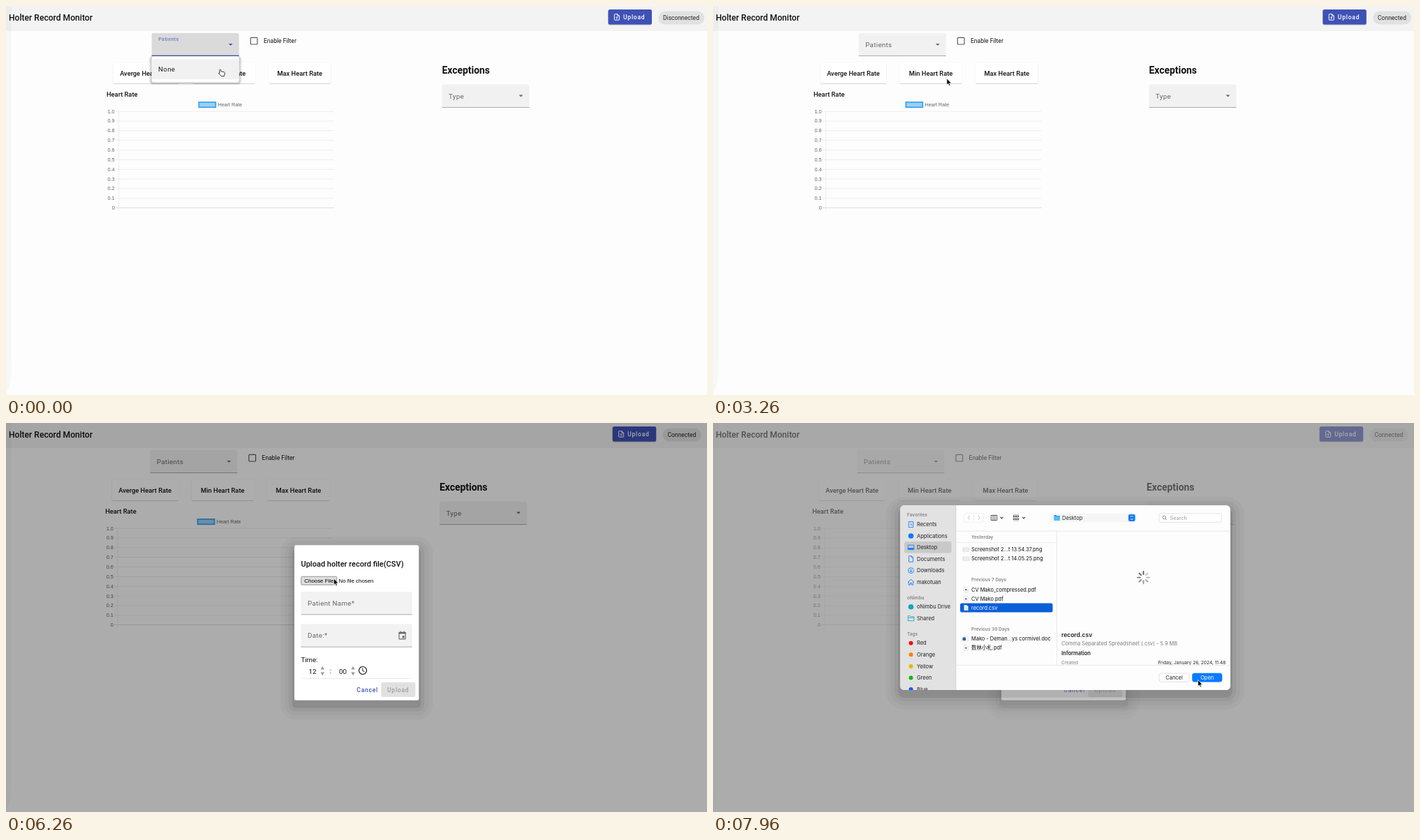
An HTML page that plays this animation: 1004x558 px, repeating every 8 s.

```html
<!DOCTYPE html>
<html lang="en">
<head>
<meta charset="utf-8">
<title>Holter Record Monitor</title>
<style>
html, body { margin: 0; width: 100%; height: 100%; overflow: hidden; background: #fdfdfd; }
svg { display: block; font-family: Roboto, sans-serif; }
.ui { font-family: Inter, sans-serif; }
.chart { font-family: "Liberation Sans", Arial, sans-serif; }
</style>
</head>
<body>
<svg id="stage" width="1004" height="558" viewBox="0 0 1004 558"></svg>
<script>
const LOOP = 8000, BLUE = '#3f51b5', MAC = '#0a7aff';
const MED = 'font-weight="500"', SEMI = 'font-weight="600"', END = 'text-anchor="end"';
const SPACED = 'letter-spacing=".3"', BUTTON = 'font-weight="500" letter-spacing=".76"';

// Cursor moves: first step, last step, number of steps, end point
const moves = [
  [150, 300, 2, 641, 69], [590, 1190, 5, 975, 7], [1490, 1780, 3, 964, 14],
  [2080, 2230, 2, 964, 14], [2820, 2970, 2, 310, 108], [3260, 4300, 8, 889, 15],
  [4440, 4740, 3, 889, 15], [4890, 5360, 4, 539, 217], [5510, 5810, 3, 469.5, 223],
  [6110, 6260, 2, 469.5, 223], [6410, 6560, 2, 473, 223.5], [6770, 7070, 3, 430, 262],
  [7220, 7370, 2, 430, 262], [7520, 7960, 4, 694.5, 368.5]
];
const steps = [{ at: 0, x: 309, y: 95 }];
for (const [from, to, n, x, y] of moves) {
  const start = steps[steps.length - 1];
  for (let i = 0; i < n; i++) {
    const k = (i + 1) / n, e = k * k * (3 - 2 * k);
    steps.push({
      at: Math.round(from + (to - from) * i / (n - 1)),
      x: start.x + (x - start.x) * e,
      y: start.y + (y - start.y) * e
    });
  }
}

// y is the middle of the capitals
const text = (x, y, s, size, fill = '#111', more = '') =>
  `<text x="${x}" y="${y + size * .36}" font-size="${size}" fill="${fill}" ${more}>${s}</text>`;
const rect = (x, y, w, h, fill, r = 0, more = '') =>
  `<rect x="${x}" y="${y}" width="${w}" height="${h}" rx="${r}" fill="${fill}" ${more}/>`;
const path = (d, fill, more = '') => `<path d="${d}" fill="${fill}" ${more}/>`;
const line = (d, color, w = .7, more = '') => path(d, 'none', `stroke="${color}" stroke-width="${w}" ${more}`);
const circle = (x, y, r, fill, more = '') => `<circle cx="${x}" cy="${y}" r="${r}" fill="${fill}" ${more}/>`;
const shift = (dx, dy, s) => `<g transform="translate(${dx} ${dy})">${s}</g>`;
const fade = (o, s) => `<g opacity="${o}">${s}</g>`;
const shadow = (x, y, w, h, r) => [20, 14, 8, 3].map((e, i) =>
  rect(x - e, y - e + 8, w + 2 * e, h + 2 * e, '#000', r + e, `opacity="${[.03, .03, .05, .09][i]}"`)).join('');
const caret = (x, y, fill) => path(`M${x - 2.9} ${y - 1.4}h5.8l-2.9 2.9z`, fill);

function field(x, y, label, open = 0) {
  const color = open ? BLUE : '#666';
  return path(`M${x} ${y + 33}v-30.5q0-2.5 2.5-2.5h120q2.5 0 2.5 2.5v30.5z`, open ? '#dadada' : '#f1f1f1') +
    text(x + 9.5, y + 16.5 - 7.5 * open, label, 9.78 - 2.4 * open, open ? '#5a68bd' : '#666', SPACED) +
    caret(x + 113, y + 16.5, color) +
    rect(x, y + 32.5 - .6 * open, 125, .7 + .6 * open, open ? BLUE : '#8c8c8c');
}

const card = (x, w, label) =>
  rect(x, 82, w, 29.8, '#bdbdbd', 2.5) + rect(x - .3, 81, w + .6, 30.2, '#fff', 2.5, 'stroke="#000" stroke-opacity=".05" stroke-width=".6"') +
  text(x + w / 2, 96.5, label, 9.3, '#111', MED + ' text-anchor="middle"');

function chart() {
  let s = text(144, 126.5, 'Heart Rate', 9.3, '#111', MED);
  let c = rect(276.3, 138, 24, 7.3, '#9bd0f5', 0, 'stroke="#36a2eb" stroke-width="1.7"') +
    text(303.5, 141.5, 'Heart Rate', 7.2, '#666');
  for (let i = 0; i <= 10; i++) {
    const y = 150.8 + i * 13.85;
    const label = i === 10 ? '0' : (1 - i / 10).toFixed(1);
    c += text(155.7, y + .2, label, 7.3, '#666', END) + rect(157, y, 313, .7, i === 10 ? '#cfcfcf' : '#e7e7e7');
  }
  return s + `<g class="chart">${c}</g>` + rect(161.3, 151, .7, 143, '#e9e9e9');
}

function toolbar(t, modal) {
  const online = t >= 2080, dx = online ? 10.8 : 0;
  let button = rect(862.5, 5.8, 62.5, 21.6, '#000', 2.5, 'opacity=".22"') + rect(862.5, 5, 62.5, 21.6, BLUE, 2.5);
  if (t >= 4440 && t < 4740) {
    button += rect(862.5, 5, 62.5, 21.6, '#fff', 2.5, 'opacity=".08"') +
      `<clipPath id="btn">${rect(862.5, 5, 62.5, 21.6, '#fff', 2.5)}</clipPath>` +
      circle(878, 15, t < 4590 ? 22 : 44, '#fff', 'opacity=".1" clip-path="url(#btn)"');
  }
  button += line('M875.8 11.6h-3.6q-.8 0-.8.8v7q0 .8.8.8h5.4q.8 0 .8-.8v-5.2zv2.6h2.6', '#fff', 1) +
    line('M874.9 19v-3.5m-1.5 1.5l1.5-1.5 1.5 1.5', '#fff', .9) +
    text(884, 16, 'Upload', 8.54, '#fff', BUTTON);
  const x = online ? 945.3 : 934.3;
  const chip = rect(x, 7.5, 1000.3 - x, 19, t >= 1190 && !online ? '#cecece' : '#e1e1e1', 9.5) +
    text(x + 6.7, 17, online ? 'Connected' : 'Disconnected', 8.54, '#222');
  return rect(0, 0, 1004, 36, '#f3f3f3') + text(4, 17, 'Holter Record Monitor', 12.1, '#111', MED) +
    shift(dx - 4.6 * modal, 0, button) + shift(-4.6 * modal, 0, chip);
}

function page(t) {
  const modal = t >= 4740 ? 1 : 0, menu = t < 590 ? 1 : t < 740 ? .4 : 0;
  let s = rect(0, 0, 1004, 558, '#fdfdfd') + toolbar(t, modal) +
    path('M0 0H8V515Q8 545 0 555Z', '#000', 'opacity=".025"');
  s += shift(-1.8 * modal, 0,
    card(153.5, 95, 'Averge Heart Rate') + card(267.3, 89.5, 'Min Heart Rate') +
    card(376, 89.5, 'Max Heart Rate') + chart());
  s += shift(-2.4 * modal, 0, field(208.7, 38.8, 'Patients', menu) +
    rect(350.3, 45.3, 9.7, 9.7, 'none', 1, 'stroke="#595959" stroke-width="1.2"') +
    text(369, 50.3, 'Enable Filter', 8.54));
  s += shift(-3.5 * modal, 0, text(624.5, 92, 'Exceptions', 13.9, '#111', 'font-weight="700"') + field(624.5, 112.5, 'Type'));
  if (menu) {
    let drop = '';
    for (let e = 4; e > 0; e--) drop += rect(208.7 - e, 73 - e / 2, 125 + 2 * e, 37.5 + e * 1.2, '#000', 2 + e, 'opacity=".06"');
    s += fade(menu, drop + rect(208.7, 72, 125, 37.5, '#fff', 2.5) + rect(208.7, 76.3, 125, 28.5, '#f1f1f1') +
      text(218, 90.7, 'None', 9.78, '#222', SPACED));
  }
  return s;
}

function dialog(t) {
  const box = (y, label) =>
    path(`M422.5 ${y + 33}v-30.5q0-2.5 2.5-2.5h154q2.5 0 2.5 2.5v30.5z`, '#f2f2f2') +
    rect(422.5, y + 32.5, 159, .7, '#8c8c8c') + text(432, y + 16.5, label, 9.78, '#666', SPACED);
  const spin = x => path(`M${x - 2.7} 353.6h5.4l-2.7-4.6zm0 4h5.4l-2.7 4.6z`, '#999');
  const over = t >= 5810;
  return shadow(413, 175.3, 178.3, 222.5, 2.5) + rect(413, 175.3, 178.3, 222.5, '#fff', 2.5) +
    text(422.5, 202.5, 'Upload holter record file(CSV)', 11, '#111', MED) +
    `<g class="chart">` +
    rect(422.8, 220.2, 51, 12, over ? '#dedede' : '#efefef', 1.5, 'stroke="#6f6f6f" stroke-width=".7"') +
    text(427.3, 226.2, 'Choose File', 7.9, '#000') + text(476.5, 226.2, 'No file chosen', 7.9, '#000') + '</g>' +
    box(242, 'Patient Name*') + box(288.3, 'Date:*') +
    rect(563, 300.3, 9.2, 9.6, 'none', 1, 'stroke="#666" stroke-width="1.1"') +
    rect(562.6, 300, 10, 2.4, '#666') + line('M565 300v-1.6m5.2 1.6v-1.6', '#666', 1.2) +
    rect(567.6, 305.3, 3, 3, '#666') +
    text(422.5, 340, 'Time:', 9.6) + text(433.5, 356, '12', 9.78) + text(463.7, 355.7, ':', 9.78) + text(477, 356, '00', 9.78) +
    spin(453.3) + spin(497) +
    circle(511, 355, 5.5, 'none', 'stroke="#111" stroke-width="1.2"') + line('M510.8 351.6v3.7l2.7 1.6', '#111', 1) +
    rect(422.5, 366.2, 159, .6, '#dcdcdc') +
    text(502.3, 382.5, 'Cancel', 8.54, BLUE, BUTTON) +
    rect(537.3, 372, 49, 21, '#e0e0e0', 2.5) + text(546, 382.5, 'Upload', 8.54, '#9e9e9e', BUTTON);
}

function sidebar() {
  const label = (y, s) => text(278, y, s, 6.5, '#858585', SEMI);
  const ink = (d, color = MAC) => line(d, color, .85);
  let s = rect(268, 115.5, 80, 265, '#e2e2e2') + rect(274, 167.7, 67.5, 16.4, '#c9c9c9', 3) +
    label(129.7, 'Favorites') + label(248, 'oNimbu') + label(300, 'Tags');
  ['Recents', 'Applications', 'Desktop', 'Documents', 'Downloads', 'makotuan'].forEach((name, i) =>
    s += text(292, 143 + i * 16.55, name, 7.5, '#222'));
  s += text(292, 261.3, 'oNimbu Drive', 7.5, '#222') + text(292, 278, 'Shared', 7.5, '#222');
  s += ink('M280.3 139.2h6.4v8h-6.4zM283.5 141.5v2.3h1.6') + circle(283.5, 159.6, 3.8, MAC) +
    ink('M279.3 172.8h8.4v6.4h-8.4zm0 4.7h8.4') + rect(279.3, 177, 8.4, 2.2, MAC) +
    ink('M280.5 188.3h3.8l2.2 2.2v6.3h-6zm3.8 0v2.2h2.2') +
    circle(283.5, 209.2, 4, 'none', `stroke="${MAC}" stroke-width=".85"`) + ink('M283.5 206.8v4.6m-1.9-1.8l1.9 1.9 1.9-1.9') +
    ink('M279 226l4.5-4 4.5 4m-7.7-1v4.8h2.2v-2.8h2v2.8h2.2v-4.8') +
    circle(283.5, 261.3, 3.8, '#16a6b6') +
    ink('M279.3 281.3v-7h3l1 1.1h4.6v5.9zm0-4.4h8.6', '#16a6b6');
  [['Red', '#ff0a0a'], ['Orange', '#ff7f0a'], ['Yellow', '#f0b400'], ['Green', '#0fb80f'], ['Blue', '#0a5cff']].forEach(([name, color], i) => {
    const y = 313.4 + i * 16.55;
    s += circle(283.5, y, 3, color) + text(292, y, name, 7.5, '#222');
  });
  return s;
}

function controls() {
  const chevron = (x, y) => line(`M${x - 1.9} ${y - 1}l1.9 2 1.9-2`, '#444', 1.1);
  let s = rect(359.5, 127.3, 28, 12.6, '#fff', 2.5, 'stroke="#e6e6e6" stroke-width=".6"') +
    line('M367.7 130.5l-2.5 3 2.5 3', '#b5b5b5', .9) + line('M379.7 130.5l2.5 3-2.5 3', '#b5b5b5', .9) +
    line('M373.5 129v9', '#ddd') +
    line('M398.3 130h8.4v7.2h-8.4zm2.8 0v7.2m2.8-7.2v7.2', '#444', .9) + chevron(413.5, 133.6) +
    chevron(445, 133.6);
  for (let i = 0; i < 6; i++) s += rect(430 + i % 3 * 2.9, i < 3 ? 130.3 : 134.3, 2.1, 2.3, '#555');
  for (const y of [129, 133.2, 137.4]) s += rect(430, y, 8, .6, '#888');
  return s + rect(483.5, 127.5, 123.5, 12.3, '#f6f6f6', 3) +
    path('M488.5 129.7h3.2l.9 1h4.4v6.6h-8.5z', '#2f9de0') + rect(488.5, 131.7, 8.5, 5.6, '#55bdf3', .5) +
    text(500, 133.6, 'Desktop', 7.5, '#222') +
    rect(595, 128.7, 9.6, 9.8, MAC, 2.2) + line('M598 132.5l1.8-1.9 1.8 1.9m-3.6 2.2l1.8 1.9 1.8-1.9', '#fff', .9) +
    rect(639, 127.4, 89.5, 12.5, '#fff', 2.5, 'stroke="#d9d9d9" stroke-width=".7"') +
    circle(646.3, 133, 2.3, 'none', 'stroke="#777" stroke-width=".8"') + line('M648 134.8l1.8 1.9', '#777', .9) +
    text(654.5, 133.7, 'Search', 7.3, '#9a9a9a');
}

function files(chosen) {
  const head = (y, s) => text(370, y, s, 6.5, '#858585', SEMI);
  const sheet = y => path(`M359.7 ${y - 3.8}h3.6l2 2v5.6h-5.6z`, '#fff', 'stroke="#c4c4c4" stroke-width=".5"');
  const pdf = y => sheet(y) + rect(361, y - .8, 2.6, 2.2, '#6b7280');
  const shot = y => rect(358, y - 2.4, 8.6, 5, '#f5f5f5', .4, 'stroke="#bbb" stroke-width=".5"') + rect(359, y, 6.5, .5, '#ccc');
  const csv = y => sheet(y) + [-1.4, .2, 1.8].map(d => rect(360.7, y + d, 3.4, .5, '#aaa')).join('');
  const doc = y => sheet(y) + rect(357.5, y - 2, 4.6, 4.6, '#2f5fa8', .5);
  const row = (y, name, icon, ink = '#111') => icon(y) + text(370, y, name, 7.45, ink);
  return head(161, 'Yesterday') + rect(348, 168.7, 144.5, .6, '#e3e3e3') +
    (chosen ? rect(354, 256.2, 132.5, 12.9, '#0a5fd9', 2.5) : '') +
    row(179.2, 'Screenshot 2…t 13.54.37.png', shot) + row(192.2, 'Screenshot 2…t 14.05.25.png', shot) +
    head(222.6, 'Previous 7 Days') + row(236.5, 'CV Mako_compressed.pdf', pdf) + row(249.6, 'CV Mako.pdf', pdf) +
    row(262.6, 'record.csv', csv, chosen ? '#fff' : '#111') +
    head(293, 'Previous 30 Days') + row(307, 'Mako - Deman…ys cormivel.doc', doc) +
    `<g font-family="Inter, 'Noto Sans CJK SC', sans-serif">${row(320, '数林小札.pdf', pdf)}</g>`;
}

function preview(turn) {
  let s = '';
  for (let i = 0; i < 8; i++)
    s += line('M0-4.6V-8.6', '#555', 1.9, `stroke-linecap="round" opacity="${.95 - ((turn - i + 16) % 8) * .09}" transform="translate(616.5 219.2) rotate(${i * 45})"`);
  return s + text(499, 301.8, 'record.csv', 8.5, '#222', SEMI) +
    text(499, 314, 'Comma Separated Spreadsheet (.csv) - 5.9 MB', 7.45, '#7d7d7d') +
    text(499, 328, 'Information', 7.5, '#222', SEMI) +
    text(499, 341.5, 'Created', 6.4, '#7d7d7d') + text(734.3, 341.5, 'Friday, January 26, 2024, 11:48', 6.6, '#222', END);
}

function picker(t, index) {
  const chosen = t >= 7220;
  const body = rect(268, 115.5, 473, 265, '#fdfdfd') + sidebar() + controls() +
    rect(348, 152.3, 393, .7, '#dedede') + files(chosen) + rect(492.2, 152.5, .7, 192.5, '#dedede') +
    (chosen ? preview(index - steps.length + 1) : '') +
    rect(348, 344.7, 393, 36, '#fdfdfd') + rect(348, 344.5, 393, .7, '#dedede') + rect(347.6, 115.5, .7, 265, '#cfcfcf') +
    rect(639, 356.6, 43, 12.3, '#fff', 3, 'stroke="#d6d6d6" stroke-width=".7"') +
    text(660.5, 362.7, 'Cancel', 7.5, '#222', 'text-anchor="middle"') +
    rect(686.5, 356.6, 42.5, 12.3, chosen ? MAC : '#fff', 3, `stroke="${chosen ? MAC : '#ececec'}" stroke-width=".6"`) +
    text(707.7, 362.7, 'Open', 7.5, chosen ? '#fff' : '#b8b8b8', 'text-anchor="middle"');
  const drop = t < 6770 ? 0 : t < 6920 ? 1.5 : 2.4;
  return shift(0, drop, shadow(268, 115.5, 473, 265, 6) +
    `<clipPath id="win">${rect(268, 115.5, 473, 265, '#fff', 6)}</clipPath><g class="ui" clip-path="url(#win)">${body}</g>`);
}

const hand = path('M-2.9 1.2L-3.2-3.4Q-2.6-4.8-1.5-3.6L-.8-1 3-.4Q4.6.2 4.4 2L3.4 5.6H-.8L-4.4 1.6Q-4.4.4-2.9 1.2z', '#fff', 'stroke="#222" stroke-width=".9" stroke-linejoin="round"');
const arrow = path('M0 0V9.2L2.1 7.3 3.5 10.4 5 9.8 3.7 6.8H6.5Z', '#000', 'stroke="#fff" stroke-width=".7"');

function scene(index) {
  const { at: t, x, y } = steps[index];
  let s = page(t);
  if (t >= 4740) {
    const fresh = t < 4890;
    s += rect(0, 0, 1004, 558, '#000', 0, `opacity="${fresh ? .28 : .32}"`) + fade(fresh ? .97 : 1, dialog(t));
  }
  if (t >= 6410) {
    const half = t < 6560;
    s += rect(0, 0, 1004, 558, '#acacac', 0, `opacity="${half ? .2 : .43}"`) + fade(half ? .5 : 1, picker(t, index));
  }
  return s + shift(x, y, index ? arrow : hand);
}

const stage = document.getElementById('stage');
let shown = -1;
function draw(now) {
  const t = now % LOOP;
  let index = steps.length - 1;
  while (steps[index].at > t) index--;
  if (index !== shown) stage.innerHTML = scene(shown = index);
  requestAnimationFrame(draw);
}
draw(0);
</script>
</body>
</html>
```
